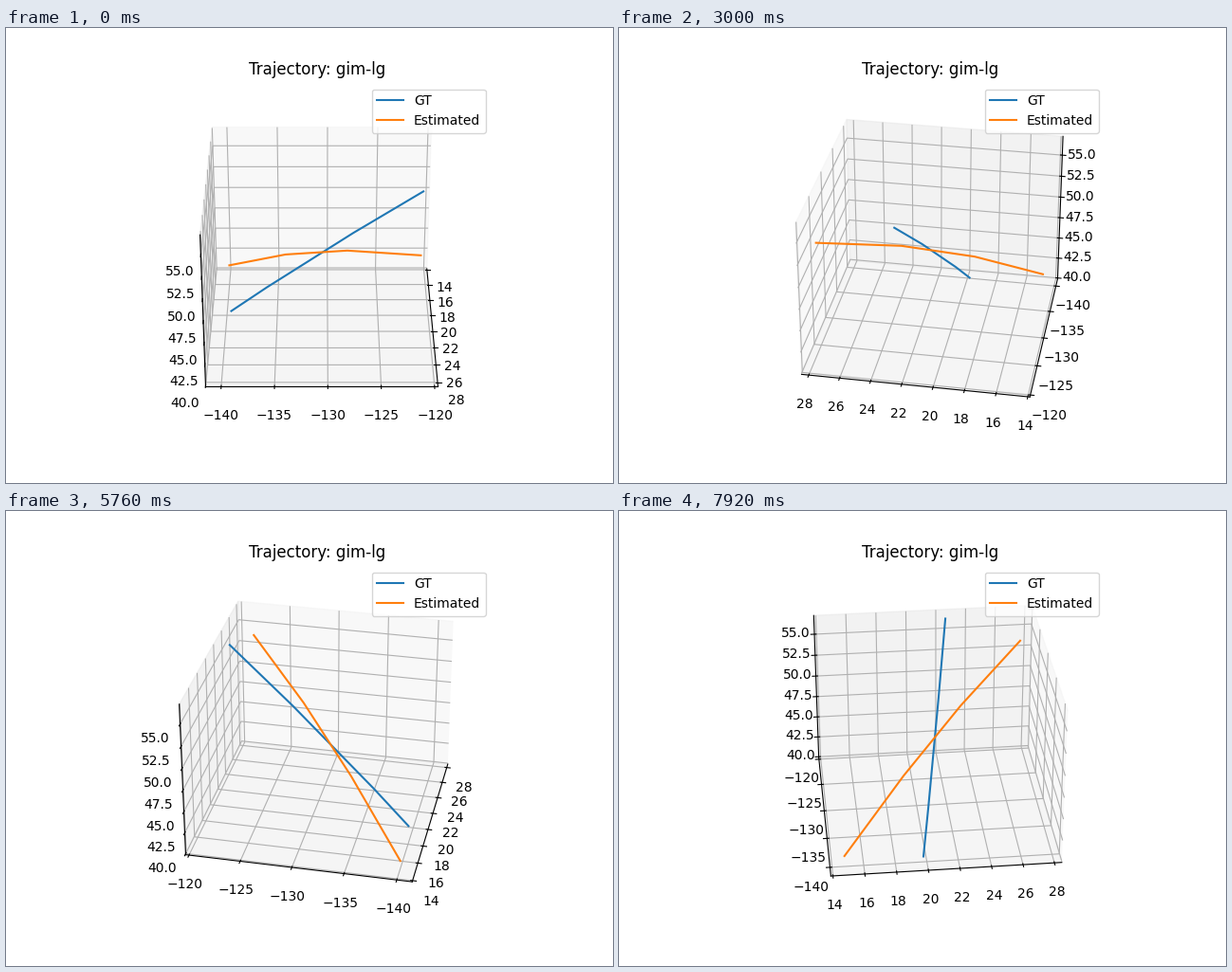
A matplotlib script that plays this animation: 640x480 px, repeating every 8 s.

```python
import matplotlib.pyplot as plt
import numpy as np
from matplotlib.animation import FuncAnimation

LOOP_MS = 8000
TICK_MS = 40
TICKS_PER_STEP = 3      # the view turns once every 120 ms
DEG_PER_STEP = 4
ELEV = 30


def arc(start, end, bow, stops):
    """Straight run from start to end, bent by a parabola of height bow."""
    t = np.array([0, *stops, 1])[:, None]
    start, end, bow = map(np.array, (start, end, bow))
    return start + (end - start) * t + bow * 4 * t * (1 - t)


gt = arc((19.81, -139.58, 40.23), (22.54, -121.06, 56.85),
         bow=(0, -0.37, 0), stops=(0.208, 0.667))
estimated = arc((14.80, -140.07, 41.18), (27.54, -121.57, 54.10),
                bow=(0, -0.06, 1.09), stops=(0.323, 0.647))

fig = plt.figure(figsize=(6.4, 4.8), dpi=100)
ax = fig.add_subplot(projection="3d")
ax.plot(*gt.T, label="GT")
ax.plot(*estimated.T, label="Estimated")
ax.set_title("Trajectory: gim-lg", x=0.499)
ax.legend(loc="upper right")


def update(tick):
    step = tick // TICKS_PER_STEP
    ax.view_init(elev=ELEV, azim=DEG_PER_STEP * step)
    return ax.lines


anim = FuncAnimation(
    fig,
    update,
    frames=LOOP_MS // TICK_MS,
    interval=TICK_MS,
    repeat=True,
    repeat_delay=0,
    blit=False,
)
plt.show()
```
